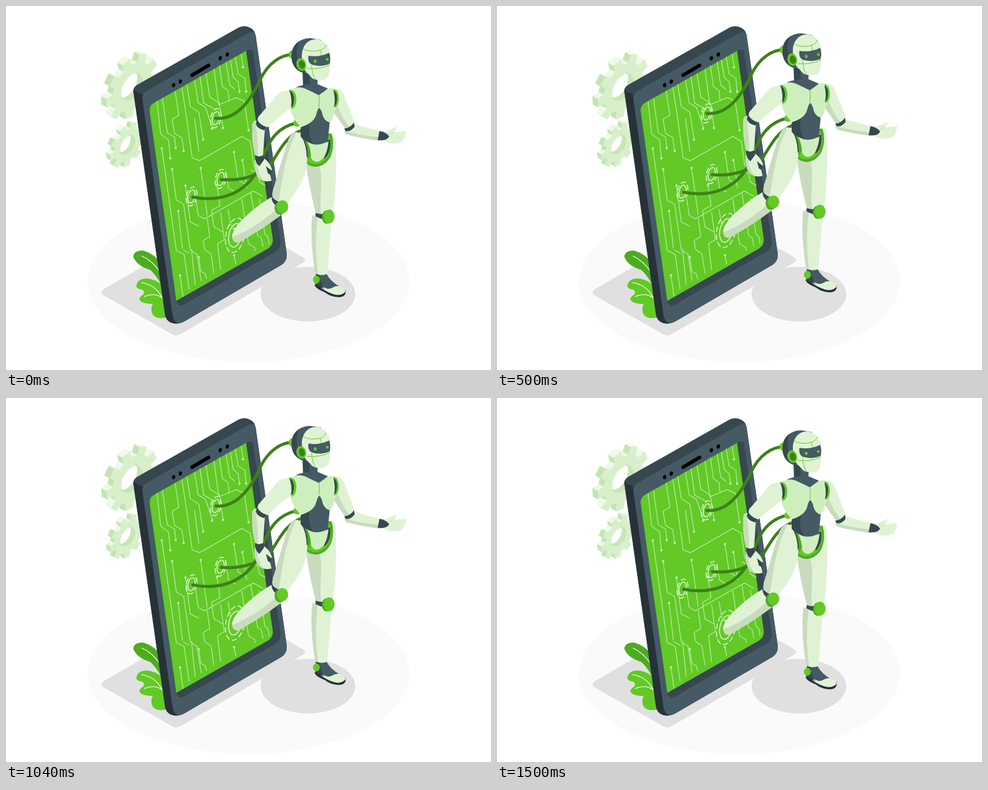
Write an HTML page that moves like this. It is 800 by 600 pixels and loops after 1.54 s.

```html
<!DOCTYPE html>
<html lang="en">
<head>
<meta charset="utf-8">
<title>Robot stepping out of a phone</title>
<style>
html, body { margin: 0; width: 100%; height: 100%; overflow: hidden; background: #fff; }
svg { display: block; width: 100vw; height: 100vh; }
.light { fill: #dff3d4; }
.mid { fill: #ceefbd; }
.shade { fill: #c9dbbf; }
.slate { fill: #455a64; }
.dark { fill: #37474f; }
.side { fill: #263238; }
.green { fill: #62c927; }
.deep { fill: #4dab20; }
.shadow { fill: #e0e0e0; }
.line { fill: none; stroke: #c0eaa9; stroke-width: 1.2; }
.ring { fill: none; stroke: #e4f6da; stroke-width: 1.5; }
.dash { stroke-dasharray: 9 4; }
.cable { fill: none; stroke: #3d8119; stroke-width: 5; stroke-linecap: round; }
.seam { fill: none; stroke: #62c927; stroke-width: 1; }
</style>
</head>
<body>
<svg viewBox="0 0 800 600">
<ellipse cx="400" cy="454" rx="265" ry="133" fill="#fafafa"/>
<ellipse class="shadow" cx="498" cy="475" rx="78" ry="45"/>
<path class="shadow" d="M161 467L370 346 490 414Q497 419 490 423L288 541Q281 545 274 541L161 477Q154 472 161 467"/>
<g id="gears"></g>

<g id="leaves">
<path class="deep" d="M210 413Q211 403 225 403Q246 408 258 428L262 470Q250 446 238 435Q215 428 210 413"/>
<path class="green" d="M215 462Q216 450 231 449Q250 450 262 465L268 512Q252 518 243 510Q237 502 242 491Q222 491 220 483Q221 478 227 475Q229 468 222 467Q216 466 215 462"/>
<path d="M224 412Q242 420 255 440M223 456Q247 459 258 482M228 479Q244 472 256 480" fill="none" stroke="#fff" stroke-width="1.2"/>
</g>

<g id="phone">
<path class="dark" d="M210 141Q209 134 218 129L381 37Q393 30 403 36Q410 39 412 49L463 408Q464 421 454 427L294 520Q280 527 270 521Q264 518 262 508Z"/>
<path class="side" d="M210 139L226 147 275 512Q278 522 285 523Q268 524 263 512Z"/>
<path class="slate" d="M225 154Q224 145 232 140L397 46Q408 40 411 46L463 408Q464 421 454 427L294 520Q279 527 275 512Z"/>
<path class="dark" d="M392 77L399 72Q407 70 408 78L453 388Q454 398 446 404L294 492Q283 497 281 485Z"/>
<path class="green" d="M237 174Q236 164 245 159L396 74 440 384Q441 394 432 400L281 486Z"/>
<path d="M307 114L334 98" stroke="#000" stroke-width="6" stroke-linecap="round"/>
<g id="holes"></g>
<path class="line" d="M249 157L255 211 268 221 271 250M258 152L266 209 278 216 280 233M279 140L285 180 274 187 278 210 290 217 293 238M290 134L297 178 307 250 319 255 389 215 403 223 409 265"/>
<path class="line" d="M298 129L304 166 318 175 325 219M311 122L317 160 329 167 341 202M320 116L326 160 346 171M330 111L336 150 352 160 358 200M343 104L351 163 380 151 393 157 400 204M352 98L357 133 366 139 368 156M363 92L369 130 377 137M370 89L375 118 383 125 385 140M378 84L383 112 394 119 396 140M388 79L391 100M311 185L318 240"/>
<path class="line" d="M257 235L281 403 294 410 302 467M274 269L281 320 293 327 304 402 315 409 322 453M284 338L291 400M296 296L304 356 318 363M313 318L317 345 327 351 408 305 424 314M321 267L332 345M348 295L353 329 339 337 343 364 357 372M363 274L367 300 379 307M376 241L383 287 395 294M390 254L397 300M404 270L415 276 418 290 428 296"/>
<path class="line" d="M332 350L336 380 325 387 328 402 338 408 343 441M354 340L360 385 349 392 354 435M287 444L292 479M318 414L321 437 329 442 331 450M376 411L379 425M389 318L400 392 410 398 411 404M404 308L415 378 421 382 424 397M418 317L427 376 432 380 434 392M366 335L371 363M306 401L312 460M292 402L303 408"/>
<g id="nodes"></g>
</g>

<g id="robot">
<g id="rings"></g>
<path class="cable" d="M346 185C382 188 405 153 419 122C432 94 454 80 473 80"/>
<path class="cable" d="M308 315C360 325 395 304 413 274C426 247 434 201 480 193"/>
<path class="cable" d="M355 286C390 289 420 279 438 259C453 234 464 213 490 204"/>
<ellipse class="green" cx="472" cy="80" rx="5.5" ry="7"/>
<ellipse class="green" cx="480" cy="193" rx="6" ry="6"/>

<g id="far-arm">
<path class="light" d="M540 138Q550 132 557 146L575 191Q570 200 560 203L541 176Z"/>
<path class="shade" d="M546 162Q555 186 567 200L560 203 541 176Z"/>
<path class="light" d="M559 204Q568 204 575 195L616 206 616 222Q590 219 562 212Q557 208 559 204"/>
<path class="shade" d="M559 205Q580 213 614 216L616 222Q590 219 562 212Q557 208 559 205"/>
<path class="dark" d="M558 202Q568 201 574 192L575 199Q568 208 560 206Z"/>
<path class="light" d="M619 209Q632 205 644 199Q645 204 640 208L660 206Q659 217 653 224Q639 230 624 223Z"/>
<path d="M640 208L629 212" stroke="#c9dbbf"/>
<path class="dark" d="M616 206Q627 208 632 215Q628 223 613 221Z"/>
</g>

<g id="standing-leg">
<path class="dark" d="M511 338L533 334 530 354 510 350Z"/>
<path class="light" d="M495 260Q508 268 520 262Q536 248 539 207Q545 214 544 235Q546 290 540 337Q524 346 511 341Q500 300 495 260"/>
<path class="shade" d="M495 260Q506 266 517 263C524 292 516 312 520 343L511 341Q500 300 495 260"/>
<path class="light" d="M505 347Q506 342 511 347Q524 353 537 355L530 442Q520 445 510 442Q501 384 505 347"/>
<path class="shade" d="M505 347Q507 343 514 349Q508 395 515 443L510 442Q501 384 505 347"/>
<ellipse class="deep" cx="529" cy="348" rx="8" ry="11"/>
<ellipse class="green" cx="533" cy="347" rx="9" ry="11.5"/>
<path class="side" d="M509 459Q522 460 532 472L560 468Q562 479 550 480Q536 480 526 472Q509 465 509 459"/>
<path class="slate" d="M511 442Q520 445 529 442Q535 454 551 463L538 470Q525 463 513 460Z"/>
<path class="dark" d="M511 442L517 443Q518 454 524 463L510 460Z"/>
<path class="light" d="M519 464Q530 468 537 465Q544 460 551 462Q560 466 560 471Q552 479 540 475Q528 471 519 464"/>
<ellipse class="green" cx="512" cy="451" rx="5.7" ry="6.5"/>
</g>

<g id="hips">
<path class="deep" d="M487 214L537 210Q543 230 535 249Q526 264 512 265Q501 265 494 258Z"/>
<path class="green" d="M487 214L533 214Q541 228 532 247Q524 260 511 261Q502 261 496 255Z"/>
<path class="dark" d="M528 222L535 220Q537 242 525 252Z"/>
<path class="mid" d="M496 222Q515 233 532 223Q529 254 513 257Q505 257 502 246Z"/>
</g>

<g id="stepping-leg">
<path class="dark" d="M439 312L452 324 449 340 436 322Z"/>
<path class="light" d="M438 315Q438 325 448 331L453 345Q420 370 383 390Q373 391 373 377Q377 365 388 354Q414 328 438 315"/>
<path class="shade" d="M373 381Q408 368 447 335L453 345Q420 370 383 390Q374 391 373 381"/>
<path class="light" d="M466 220Q474 203 485 210Q497 222 497 250C497 285 478 305 464 326Q450 326 440 316Q438 306 443 296Q455 252 466 220"/>
<path class="shade" d="M466 220Q472 207 479 208C460 246 456 285 450 322L440 316Q438 306 443 296Q455 252 466 220"/>
<ellipse class="deep" cx="452" cy="333" rx="9" ry="11"/>
<ellipse class="green" cx="456" cy="331" rx="9.5" ry="10.8"/>
<path class="dark" d="M486 213Q497 222 500 246L496 250Q496 228 486 213"/>
<path class="deep" d="M489 215Q502 226 503 247L497 255Q500 232 489 215"/>
</g>

<g id="torso">
<path class="dark" d="M489 107L514 118 513 134 490 132Z"/>
<path class="slate" d="M500 115L514 118 513 134 502 132Z"/>
<path class="slate" d="M478 134Q492 128 512 128L531 136 516 149Z"/>
<path class="slate" d="M486 200Q504 195 511 178L516 165 523 178 534 191 531 222Q520 230 508 228Q488 221 486 214Z"/>
<path class="dark" d="M486 200L501 194Q497 212 507 228Q488 221 486 214Z"/>
<path class="mid" d="M469 139Q480 131 493 136L516 147 530 137Q538 133 546 138L541 165Q543 184 534 192Q523 189 521 174Q516 161 512 178Q508 194 486 199L478 190Q468 174 468 162Z"/>
<path class="seam" d="M516 147Q518 157 516 167"/>
<path class="green" d="M540 137Q549 138 549 154Q548 167 541 168Q548 154 540 137"/>
<path class="dark" d="M540 139Q547 142 546 155Q545 164 541 166Q544 154 540 139"/>
</g>

<g id="near-arm">
<path class="light" d="M468 139Q450 138 441 154L416 183Q413 192 419 196L431 200Q454 179 470 168Z"/>
<path class="green" d="M467 138Q479 138 479 155Q478 168 471 170Q475 153 467 138"/>
<path class="dark" d="M467 139Q476 143 475 156Q474 166 470 167Q473 153 467 139"/>
<path class="light" d="M406 199Q406 189 414 189Q418 202 427 203L424 246Q417 250 411 246Q405 225 406 199"/>
<path class="shade" d="M406 199Q406 190 411 189Q416 218 416 248L411 246Q405 225 406 199"/>
<path class="dark" d="M414 187Q420 197 429 199L426 205Q414 202 412 194Z"/>
<path class="light" d="M410 254L424 250Q435 257 439 270Q435 274 429 264Q431 274 436 279L438 288Q427 291 418 285Q409 276 410 254"/>
<path class="shade" d="M410 254L415 260Q414 275 425 288Q409 285 410 254"/>
<path class="dark" d="M411 246Q418 250 424 246L426 253 418 264Q410 258 411 246M429 264L439 272Q436 278 432 276Z"/>
</g>

<g id="head">
<path class="slate" d="M471 84C470 65 484 53 502 53L520 56 505 108 490 110C478 107 471 96 471 84"/>
<path class="dark" d="M471 84Q471 66 483 59Q473 82 490 110Q472 104 471 84"/>
<path class="light" d="M488 85C487 64 500 54 512 55C526 56 534 67 535 82L534 108Q532 121 523 122Q511 123 505 119L493 106Z"/>
<path class="seam" d="M490 70Q497 76 514 74Q526 72 528 64M518 73Q521 78 520 83M504 98Q505 112 510 121M496 103Q518 105 534 97"/>
<path class="slate" d="M499 82Q517 85 533 77Q536 83 534 95Q518 102 503 96Q497 91 499 82"/>
<ellipse class="green" cx="510" cy="91" rx="2.4" ry="2.8"/>
<ellipse class="green" cx="530" cy="88" rx="2.4" ry="2.3"/>
<ellipse class="green" cx="487" cy="96.5" rx="8" ry="10.5" transform="rotate(-15 487 96.5)"/>
<ellipse cx="488" cy="96.5" rx="5" ry="7" transform="rotate(-15 488 96.5)" fill="#3d8119"/>
</g>
</g>
</svg>

<script>
const byId = id => document.getElementById(id);

const ellipse = (x, y, rx, ry, attrs) =>
  `<ellipse cx="${x}" cy="${y}" rx="${rx}" ry="${ry}" transform="rotate(12 ${x} ${y})" ${attrs}/>`;

byId('holes').innerHTML = [[276.5, 130.5], [287.5, 124.5], [353.5, 86], [365, 80]]
  .map(([x, y]) => ellipse(x, y, 2.7, 3.6, '')).join('');

byId('nodes').innerHTML = [
  [257, 235], [271, 251], [280, 234], [293, 239], [325, 220], [340, 202], [358, 201], [385, 141],
  [396, 141], [391, 101], [400, 205], [274, 269], [321, 267], [348, 295], [296, 296], [376, 241],
  [390, 254], [284, 338], [287, 444], [318, 414], [376, 411], [376, 367]
].map(([x, y]) => ellipse(x, y, 1.8, 2.3, 'fill="#c0eaa9"')).join('');

byId('rings').innerHTML = [[346, 185, 1], [354, 285, 1], [306, 314, 1], [378, 378, 1.8]]
  .map(([x, y, k]) => ellipse(x, y, 5.7 * k, 11 * k, 'class="ring"') +
    ellipse(x, y, 8.5 * k, 16 * k, 'class="ring dash"')).join('');

// Gear in an isometric plane, extruded toward the upper left
function gear(cx, cy, radius, teeth, depth, turn) {
  const point = (r, deg) => {
    const a = deg * Math.PI / 180, u = r * Math.sin(a), v = -r * Math.cos(a);
    return { u, v, x: cx + .87 * u, y: cy - .5 * u + v };
  };
  const shape = (pts, fill) =>
    `<path d="M${pts.map(p => p.x.toFixed(1) + ' ' + p.y.toFixed(1)).join('L')}Z" fill="${fill}" stroke="${fill}" stroke-width=".4"/>`;
  const back = p => ({ x: p.x - depth, y: p.y - depth * .55 });
  const walls = pts => pts.map((p, i) => {
    const q = pts[(i + 1) % pts.length];
    const hidden = (q.x - p.x) * -.55 + (q.y - p.y) > 0;
    const fill = Math.abs(q.u - p.u) > Math.abs(q.v - p.v) ? '#eef9e8' : '#c5e4b5';
    return hidden ? '' : shape([p, q, back(q), back(p)], fill);
  }).join('');

  const rim = [], hole = [];
  for (let i = 0; i < teeth; i++) {
    const mid = turn + i * 360 / teeth, w = 360 / teeth;
    rim.push(point(radius * .76, mid - w * .3), point(radius, mid - w * .22),
      point(radius, mid + w * .22), point(radius * .76, mid + w * .3));
  }
  for (let a = 360; a > 0; a -= 10) hole.push(point(radius * .42, a));
  return walls(rim) + shape(rim, '#d8f0ca') + shape(hole, '#fff') +
    walls(hole).replaceAll('#eef9e8', '#c5e4b5');
}
byId('gears').innerHTML = gear(208, 134, 48, 9, 9, 27) + gear(201, 229, 33, 9, 7, 23);

const LOOP = 1540, BEAT = 1500, FRAME = 1000 / 24;
const start = performance.now();

// Double pulse, like a heartbeat
function pulse(p) {
  if (p < .1) return p / .1;
  if (p < .3) return (.3 - p) / .2;
  return Math.max(0, 1 - Math.abs(p - .5) / .1);
}

function draw() {
  const t = Math.max(0, performance.now() - start) % LOOP;
  const step = Math.floor((t + 3.4) / FRAME) % 37;
  const phase = Math.min(1, (step * FRAME + 14) / BEAT);
  const lift = 12 * (1 - Math.abs(1 - 2 * phase));
  byId('robot').setAttribute('transform', `translate(0 ${.2 - lift})`);
  byId('gears').setAttribute('transform',
    `translate(203 171) scale(${1 + .1 * pulse(phase)}) translate(-203 -171)`);
  requestAnimationFrame(draw);
}
draw();
</script>
</body>
</html>
```
